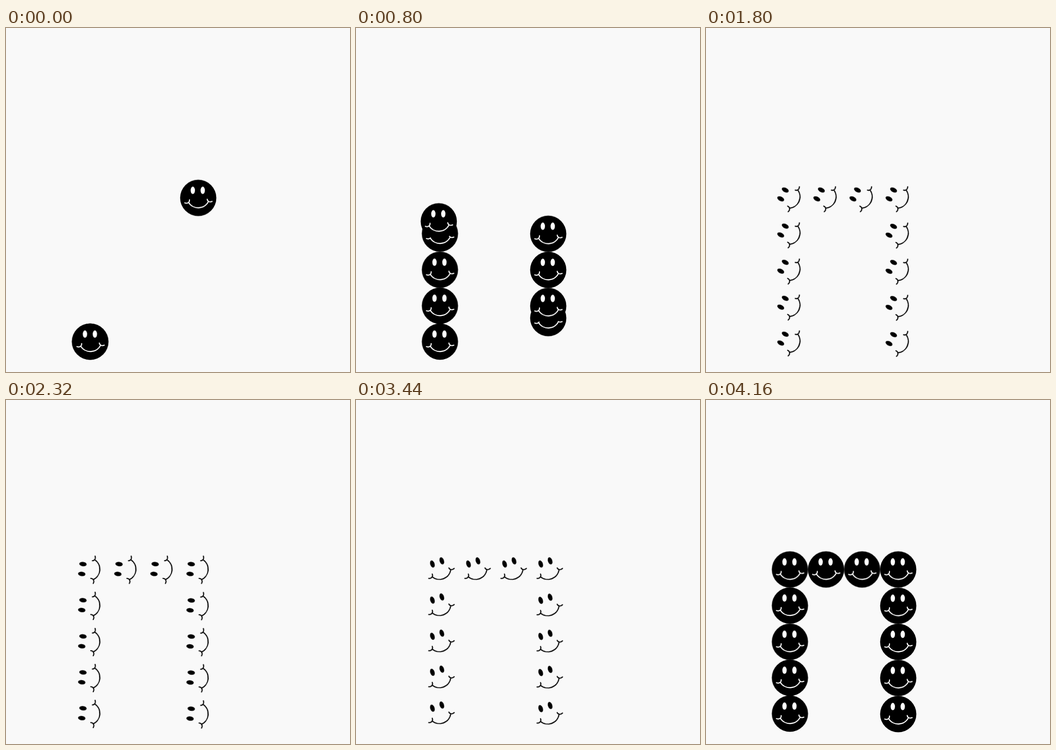
These frames come from a looping animation (748x748 px, 4800 ms). An HTML page without scripts:

```html
<!DOCTYPE html>
<html lang="en">
<head>
<meta charset="utf-8">
<title>Smiley arch</title>
<style>
  html, body { margin: 0; width: 100%; height: 100%; overflow: hidden; background: #f9f9f9; }
  svg { display: block; width: 100vw; height: 100vh; }

  /* every part shares one 4.8 s loop, drawn in 40 ms ticks */
  .ink, .spin, .climb, .drop, .s1, .s2, .s3, .s4, .s5, .s6 {
    animation: 4800ms step-end -4ms infinite;
  }

  /* disc takes fill, face takes color */
  .ink { animation-name: ink; }
  @keyframes ink {
    0%, 78.3333%, to { fill: #000; color: #fff; }
    35% { fill: transparent; color: #000; }
  }

  .spin { animation-name: spin; }
  @keyframes spin {
    0% { transform: rotate(0deg); }
    18.3333% { transform: rotate(0deg); animation-timing-function: steps(33); }
    45.8333% { transform: rotate(-90deg); animation-timing-function: steps(39); }
    78.3333%, to { transform: rotate(0deg); }
  }

  /* up the left side, round the corner, along the top */
  .climb {
    offset-path: path("M183.5 682 L182.5 447 C182.5 421 169.5 381.5 182.5 368.5 C195.5 355.5 235 368.5 261 368.5 H418");
    offset-rotate: 0deg;
    animation-name: climb;
    animation-timing-function: steps(6);
  }
  @keyframes climb {
    0% { offset-distance: 0px; }
    5% { offset-distance: 78.4px; }
    10% { offset-distance: 156.7px; }
    15% { offset-distance: 235px; }
    20% { offset-distance: 315.2px; }
    25% { offset-distance: 395.4px; }
    30% { offset-distance: 473.9px; }
    35%, to { offset-distance: 100%; }
  }

  .drop { animation-name: drop; animation-timing-function: steps(24); }
  @keyframes drop {
    0% { transform: translate(418px, 369.4px); }
    20%, to { transform: translate(418px, 683px); }
  }

  /* faces left behind, one per 240 ms */
  .s1 { animation-name: s1; }
  .s2 { animation-name: s2; }
  .s3 { animation-name: s3; }
  .s4 { animation-name: s4; }
  .s5 { animation-name: s5; }
  .s6 { animation-name: s6; }
  @keyframes s1 { 0% { visibility: hidden; } 5%, to { visibility: visible; } }
  @keyframes s2 { 0% { visibility: hidden; } 10%, to { visibility: visible; } }
  @keyframes s3 { 0% { visibility: hidden; } 15%, to { visibility: visible; } }
  @keyframes s4 { 0% { visibility: hidden; } 20%, to { visibility: visible; } }
  @keyframes s5 { 0% { visibility: hidden; } 25%, to { visibility: visible; } }
  @keyframes s6 { 0% { visibility: hidden; } 30%, to { visibility: visible; } }
</style>
</head>
<body>
<svg class="ink" viewBox="0 0 748 748">
  <defs>
    <g id="face">
      <circle r="39.4"/>
      <g fill="currentColor">
        <ellipse cx="-11.8" cy="-16.4" rx="4.7" ry="8"/>
        <ellipse cx="9.8" cy="-16.4" rx="4.7" ry="8"/>
      </g>
      <path fill="none" stroke="currentColor" stroke-width="2.3" stroke-linecap="round"
        d="M-21 9.8 A24.8 24.8 0 0 0 22 8.3 M-29.3 10.8 C-24 13.2 -18.8 10 -19 4.2 M19.5 2.8 C20 7.5 24.5 10.2 30.2 7.6"/>
    </g>
  </defs>

  <g class="drop"><use href="#face" class="spin"/></g>

  <g transform="translate(182.5 682)"><use href="#face" class="spin"/></g>
  <g class="s1">
    <g transform="translate(182.5 604)"><use href="#face" class="spin"/></g>
    <g transform="translate(418 447.5)"><use href="#face" class="spin"/></g>
  </g>
  <g class="s2">
    <g transform="translate(182.5 525.7)"><use href="#face" class="spin"/></g>
    <g transform="translate(418 526)"><use href="#face" class="spin"/></g>
  </g>
  <g class="s3">
    <g transform="translate(182.5 447)"><use href="#face" class="spin"/></g>
    <g transform="translate(418 604.5)"><use href="#face" class="spin"/></g>
  </g>

  <g class="climb"><use href="#face" class="spin"/></g>

  <g class="s4" transform="translate(182.5 368.5)"><use href="#face" class="spin"/></g>
  <g class="s5" transform="translate(261 368.5)"><use href="#face" class="spin"/></g>
  <g class="s6" transform="translate(339.5 368.5)"><use href="#face" class="spin"/></g>
</svg>
</body>
</html>
```
